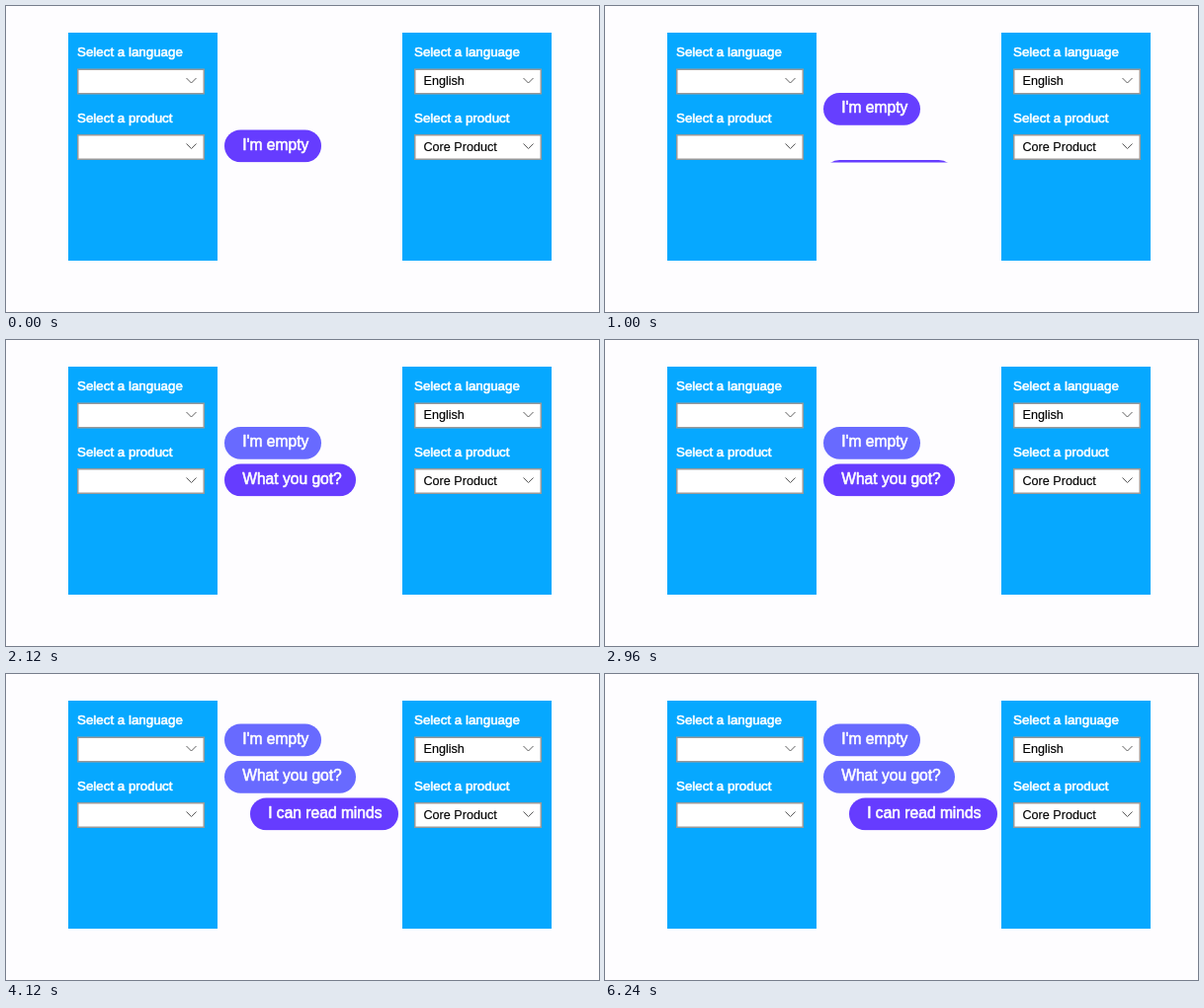
Animation, 600 px wide and 310 px high, one loop 6.28 s. Source, as an HTML page with a canvas:

```html
<!DOCTYPE html>
<html lang="en">
<head>
<meta charset="utf-8">
<title>Chat between two panels</title>
<style>
  html, body { margin: 0; width: 100%; height: 100%; overflow: hidden; background: #fefdff; }
  canvas { display: block; width: 600px; height: 310px; }
</style>
</head>
<body>
<canvas id="stage" width="600" height="310"></canvas>
<script>
const ctx = document.getElementById('stage').getContext('2d');
const LOOP = 6280;
const SLIDE = 400;
const ROW = 37.5;
const BASE = 125.5;
const RISE = 33;
const FONT = '"Liberation Sans", Arial, sans-serif';
const DARK = [102, 60, 255];
const LIGHT = [104, 106, 255];

// Each bubble: text, left edge, width, moment it starts to enter
const bubbles = [
  { text: "I'm empty", x: 221, w: 98, enter: -SLIDE },
  { text: 'What you got?', x: 221, w: 133, enter: 930 },
  { text: 'I can read minds', x: 247, w: 150, enter: 3540 }
];

function swing(t, start) {
  const p = Math.min(1, Math.max(0, (t - start) / SLIDE));
  return (1 - Math.cos(Math.PI * p)) / 2;
}

function label(text, x, y, size, color, weight) {
  ctx.font = size + 'px ' + FONT;
  ctx.fillStyle = ctx.strokeStyle = color;
  ctx.lineWidth = weight;
  ctx.lineJoin = 'round';
  ctx.fillText(text, x, y);
  ctx.strokeText(text, x, y);
}

function select(x, y, value) {
  ctx.fillStyle = '#999';
  ctx.fillRect(x, y, 129, 26);
  ctx.fillStyle = '#fff';
  ctx.fillRect(x + 1.5, y + 1.5, 126, 23);
  ctx.strokeStyle = '#555';
  ctx.lineWidth = 0.95;
  ctx.lineJoin = 'miter';
  ctx.beginPath();
  ctx.moveTo(x + 110.5, y + 9.5);
  ctx.lineTo(x + 115.5, y + 14.5);
  ctx.lineTo(x + 120.5, y + 9.5);
  ctx.stroke();
  label(value, x + 9.5, y + 16.5, 12.6, '#000', 0.15);
}

function panel(x, inner, language, product) {
  ctx.fillStyle = '#06a8ff';
  ctx.fillRect(x, 27, 151, 231);
  label('Select a language', inner, 51.4, 13.35, '#fff', 0.6);
  select(inner, 63.5, language);
  label('Select a product', inner, 118, 13.35, '#fff', 0.6);
  select(inner, 130, product);
}

function bubble(b, y, fade) {
  const rgb = DARK.map((c, i) => Math.round(c + (LIGHT[i] - c) * fade));
  ctx.fillStyle = 'rgb(' + rgb + ')';
  ctx.beginPath();
  ctx.roundRect(b.x, y, b.w, 32.7, 16.35);
  ctx.fill();
  label(b.text, b.x + 18.2, y + 20.2, 15.6, '#fff', 0.6);
}

function draw(t) {
  ctx.fillStyle = '#fefdff';
  ctx.fillRect(0, 0, 600, 310);
  panel(63, 72, '', '');
  panel(401, 413, 'English', 'Core Product');

  ctx.save();
  ctx.beginPath();
  ctx.rect(214, 0, 187, 158.5);
  ctx.clip();
  bubbles.forEach((b, i) => {
    if (t < b.enter) return;
    let y = BASE + RISE * (1 - swing(t, b.enter));
    // Room is made first, then the next bubble rises into it
    for (const later of bubbles.slice(i + 1)) {
      y -= ROW * swing(t, later.enter - SLIDE);
    }
    const next = bubbles[i + 1];
    bubble(b, y, next ? swing(t, next.enter) : 0);
  });
  ctx.restore();
}

const start = performance.now();
function frame() {
  draw((performance.now() - start) % LOOP);
  requestAnimationFrame(frame);
}
frame();
</script>
</body>
</html>
```
